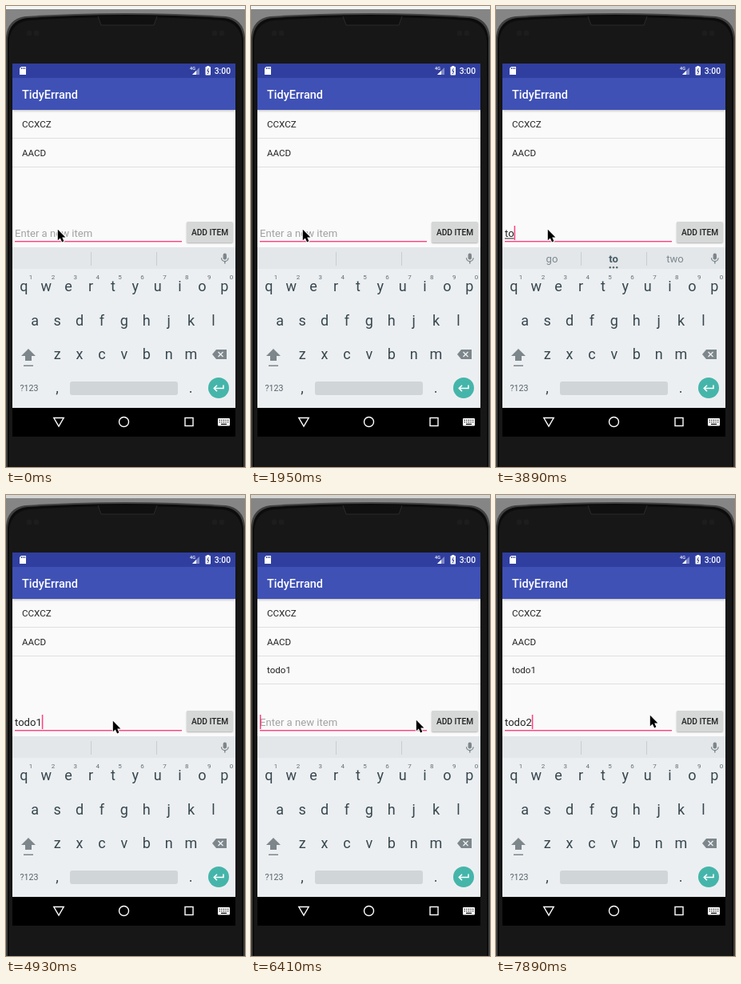
An HTML page with a canvas for the animation above (8 s loop, 299 by 577 pixels).

```html
<!DOCTYPE html>
<html lang="en">
<head>
<meta charset="utf-8">
<title>Task list</title>
<style>
html, body { margin: 0; width: 100%; height: 100%; overflow: hidden; background: #151515; }
canvas { display: block; width: 299px; height: 577px; }
</style>
</head>
<body>
<canvas id="stage"></canvas>
<script>
const W = 299, H = 577, LOOP = 8000, TICK = 148.8;
const canvas = document.getElementById('stage');
const ratio = window.devicePixelRatio || 1;
canvas.width = W * ratio;
canvas.height = H * ratio;
const c = canvas.getContext('2d');
c.scale(ratio, ratio);

const FONT = 'Roboto, "Noto Sans", sans-serif';
const PINK = '#ff4081', KEY = '#37474f', ICON = '#7c868b';

// Story of the clip
const FOCUS = 3120, PRESS = 5800, ADD = 5950, BLINK = 500, HINT_LAG = 100;
const runs = [
  { word: 'todo1', start: 3410, pace: 240, end: ADD },
  { word: 'todo2', start: 6980, pace: 150, end: LOOP }
];
const home = { x: 64, y: 279 };
const glides = [
  { start: 4675, time: 1129, x: 249, y: 287 },
  { start: 6250, time: 140, x: 206, y: 281 },
  { start: 6400, time: 290, x: 192, y: 275 }
];
const hints = {
  t: ['the', 't', 'to'],
  to: ['go', 'to', 'two'],
  tod: ['toe', 'tod', 'too'],
  todo: ['today', 'todo', 'too']
};

// Reaching the digit takes one extra beat
const keyTime = (run, i) => run.start + run.pace * (i < 4 ? i : i + 1);

function typedAt(t) {
  const run = runs.find(r => t >= r.start && t < r.end);
  return run ? [...run.word].filter((_, i) => t >= keyTime(run, i)).join('') : '';
}

function caretOn(t) {
  const edits = [-700, ADD];
  for (const run of runs) [...run.word].forEach((_, i) => edits.push(keyTime(run, i)));
  const last = Math.max(...edits.filter(e => e <= t));
  return Math.floor((t - last) / BLINK) % 2 === 0;
}

function mouseAt(t) {
  let { x, y } = home;
  for (const g of glides) {
    const p = Math.min(1, Math.max(0, (t - g.start) / g.time));
    const ease = p * (2 - p);
    x += (g.x - x) * ease;
    y += (g.y - y) * ease;
  }
  return [Math.round(x), Math.round(y)];
}

function rect(x, y, w, h, fill) {
  c.fillStyle = fill;
  c.fillRect(x, y, w, h);
}

function round(x, y, w, h, r, fill) {
  c.beginPath();
  c.roundRect(x, y, w, h, r);
  c.fillStyle = fill;
  c.fill();
}

function disc(x, y, r, fill) {
  c.beginPath();
  c.arc(x, y, r, 0, 7);
  c.fillStyle = fill;
  c.fill();
}

function trace(points, closed) {
  c.beginPath();
  points.forEach(([x, y]) => c.lineTo(x, y));
  if (closed) c.closePath();
}

function poly(points, fill) {
  trace(points, true);
  c.fillStyle = fill;
  c.fill();
}

function line(points, stroke, width = 1, closed = false) {
  trace(points, closed);
  c.strokeStyle = stroke;
  c.lineWidth = width;
  c.stroke();
}

function text(str, x, y, size, fill, align = 'left', weight = 400) {
  c.font = `${weight} ${size}px ${FONT}`;
  c.textAlign = align;
  c.fillStyle = fill;
  c.fillText(str, x, y);
}

function shadow(alpha, blur, dy) {
  c.shadowColor = `rgba(0,0,0,${alpha})`;
  c.shadowBlur = blur * ratio;
  c.shadowOffsetY = dy * ratio;
}

function shell(inset, top, fill) {
  const left = inset, right = W - inset, side = top + 30;
  c.beginPath();
  c.moveTo(left, H);
  c.lineTo(left, side);
  c.quadraticCurveTo(left + 2, top + 7, left + 24, top + 4);
  c.quadraticCurveTo(W / 2, top - 4, right - 24, top + 4);
  c.quadraticCurveTo(right - 2, top + 7, right, side);
  c.lineTo(right, H);
  c.fillStyle = fill;
  c.fill();
}

function drawPhone(t) {
  rect(0, 0, W, H, '#858585');
  rect(0, 0, W, 4, t < FOCUS ? '#f4f6f5' : '#d3d5d4');
  shell(0, 9, '#404040');
  shell(2, 11, '#0c0c0c');
  shell(4, 14, '#171717');
  const ear = [[115, 13], [119, 24], [185, 24], [189, 13]];
  poly(ear, '#101010');
  line(ear, '#2b2b2b');
  for (const x of [29, 38, 261, 270]) disc(x, 34, 3.5, '#1d1d1d');
}

function drawStatus() {
  rect(8, 72, 279, 18, '#303f9f');
  poly([[19, 76], [25, 76], [25, 86], [17, 86], [17, 78]], '#fff');
  for (let i = 0; i < 3; i++) rect(19 + i * 2, 77, 1, 2, '#303f9f');
  text('4G', 230, 80, 5.5, '#fff', 'left', 500);
  poly([[242, 77], [242, 86], [233, 86]], 'rgba(255,255,255,.4)');
  poly([[238, 81], [238, 86], [233, 86]], '#fff');
  round(249.5, 76, 6.5, 10.5, 0.8, '#fff');
  rect(251.3, 75, 3, 1.5, '#fff');
  line([[253.3, 78], [251.8, 81.5], [253.8, 81.5], [252.3, 85]], '#303f9f');
  text('3:00', 281, 85, 10.3, '#fff', 'right', 500);
}

function drawButton(t) {
  const down = t >= PRESS && t < ADD + TICK;
  shadow(down ? 0.45 : 0.3, down ? 4 : 2, 1);
  round(226, 270, 57.7, 26, 1.5, down ? '#c3c4c4' : '#d6d7d7');
  shadow(0, 0, 0);
  text('ADD ITEM', 255, 287, 10.2, '#212121', 'center', 500);
}

function drawApp(t) {
  rect(8, 130, 279, 172, '#fafafa');
  shadow(0.28, 3, 1);
  rect(8, 90, 279, 40, '#3f51b5');
  shadow(0, 0, 0);
  drawStatus();
  text('TidyErrand', 20, 116, 14.5, '#fff', 'left', 500);

  const items = ['CCXCZ', 'AACD'];
  if (t >= ADD) items.push('todo1');
  items.forEach((item, i) => {
    const y = Math.round(152 + i * 35.7);
    text(item, 20, y, 11.6, '#212121');
    rect(8, y + 13, 279, 1, '#dfdfdf');
  });

  const typed = typedAt(t);
  text(typed || 'Enter a new item', 11, 289, 13.1, typed ? '#212121' : '#a2a2a2');
  const end = typed ? c.measureText(typed).width : 0;
  if (typed && !/\d/.test(typed)) rect(11, 290.5, end, 1, '#212121');
  rect(11, 294, 209, 1.4, PINK);
  if (caretOn(t)) rect(11 + end, 275, 1.5, 18, PINK);
  drawButton(t);
}

function drawSuggestions(t) {
  rect(8, 302, 279, 28, '#e3e7e9');
  for (const x of [106, 188]) rect(x, 308, 1, 17, '#c8cdd0');
  const words = hints[typedAt(t - HINT_LAG)];
  if (words) {
    words.forEach((word, i) => {
      const mid = i === 1;
      text(word, 70 + i * 77, 321, 13.1, mid ? '#455a64' : '#7b888f', 'center', mid ? 700 : 400);
    });
    for (let i = -1; i < 2; i++) disc(147 + i * 4.2, 327.3, 1.2, '#546770');
  }
  round(271.6, 309.5, 4.4, 8, 2.2, ICON);
  c.beginPath();
  c.arc(273.8, 315.3, 4.3, 0, Math.PI);
  c.strokeStyle = ICON;
  c.lineWidth = 1.2;
  c.stroke();
  rect(273.1, 319.5, 1.4, 3, ICON);
}

function drawKeys() {
  rect(8, 329, 279, 174, '#eceff1');
  const row = (keys, x, y, size = 18, fill = KEY) => [...keys].forEach((key, i) =>
    text(key, x + i * 27.9, y, size, fill, 'center'));
  ['qwertyuiop', 'asdfghjkl', 'zxcvbnm'].forEach((keys, i) =>
    row(keys, 147.8 - (keys.length - 1) * 13.95, Math.round(357 + i * 42.5)));
  row('1234567890', 31, 342, 8, '#5f6d74');

  poly([[28, 429], [37, 438], [32, 438], [32, 444], [24, 444], [24, 438], [19, 438]], ICON);
  rect(22, 449.5, 12, 1.5, ICON);
  poly([[263, 430], [276, 430], [276, 442], [263, 442], [258, 436]], ICON);
  for (const d of [-3, 3]) line([[268.5 - d, 433], [268.5 + d, 439]], '#eceff1', 1.4);

  text('?123', 29, 482, 10.6, '#55646b', 'center');
  text(',', 64, 484, 18, KEY, 'center');
  text('.', 231, 484, 18, KEY, 'center');
  round(80, 470, 135, 17, 3, '#d0d5d7');
  disc(266, 478, 13, '#45b5aa');
  line([[272, 474.5], [272, 478.5], [261, 478.5]], '#fff', 1.6);
  line([[264, 474.7], [260.3, 478.5], [264, 482.3]], '#fff', 1.6);
}

function drawNav() {
  rect(8, 503, 279, 36, '#000');
  line([[59.8, 515.5], [72.2, 515.5], [66, 526]], '#fff', 1.4, true);
  c.beginPath();
  c.arc(147.5, 520.5, 6, 0, 7);
  c.stroke();
  c.strokeRect(224, 515.5, 10, 10);
  round(265, 516, 15, 9.5, 1, '#fff');
  for (let i = 0; i < 10; i++) {
    rect(266.7 + (i % 5) * 2.6, i < 5 ? 517.8 : 520.2, 1.2, 1.2, '#000');
  }
  rect(269, 522.8, 7, 1.2, '#000');
}

function drawMouse(t) {
  const [x, y] = mouseAt(t);
  const arrow = [[0, 0], [0, 13.5], [3, 10.7], [5.3, 15.6], [7.6, 14.5], [5.4, 9.8], [9.6, 9.6]]
    .map(([dx, dy]) => [x + 0.8 + dx, y + 0.8 + dy]);
  c.lineJoin = 'round';
  line(arrow, '#fff', 2, true);
  c.lineJoin = 'miter';
  poly(arrow, '#000');
}

function draw(t) {
  drawPhone(t);
  drawApp(t);
  drawSuggestions(t);
  drawKeys();
  drawNav();
  drawMouse(t);
}

const begin = performance.now();
function tick() {
  const t = (performance.now() - begin) % LOOP;
  draw(Math.floor(t / TICK) * TICK);
  requestAnimationFrame(tick);
}
tick();
</script>
</body>
</html>
```
